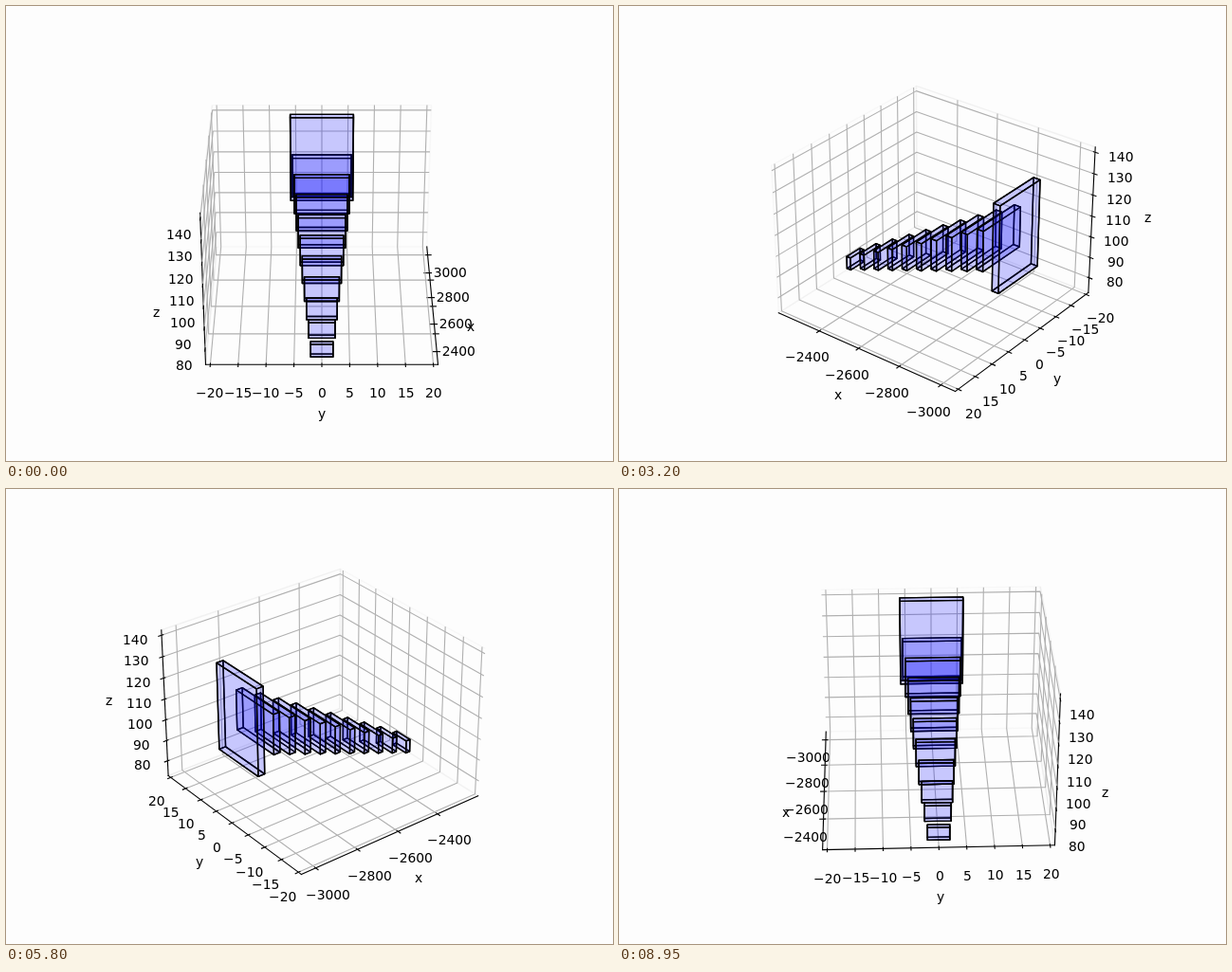
Recreate the animation shown at these times as an HTML page with a canvas. Size 640 by 480 pixels, loop 9000 ms.

```html
<!DOCTYPE html>
<html>
<head>
<meta charset="utf-8">
<style>
html, body { margin: 0; width: 100%; height: 100%; overflow: hidden; background: #fdfdfd; }
canvas { display: block; }
</style>
</head>
<body>
<canvas id="stage" width="640" height="480"></canvas>
<script>
const ctx = document.getElementById('stage').getContext('2d');

const FRAME_MS = 50, FRAMES = 180;
const ELEV = Math.PI / 6, DISTANCE = 10;
const SCALE = 369.6 / 0.185, CENTER_X = 333, CENTER_Y = 237.4;
const PT = 100 / 72;

// World space is centred on the plot box; the drawn box is 1/24 larger than the limits.
const SIZE = [8 / 7, 8 / 7, 6 / 7];
const HALF = SIZE.map(s => s / 2 * 25 / 24);
const DELTA = SIZE.map(s => s / 12);
const POINT = 48 / (2 * 369.6 * 0.72);
const LABEL_OFFSET = 25 * POINT, TICK_LABEL_OFFSET = 11.5 * POINT;

const range = (from, to, step) =>
  Array.from({ length: (to - from) / step + 1 }, (_, i) => from + i * step);

// "tickDir" is the dimension along which tick marks point.
const AXES = [
  { name: 'x', limits: [-3050, -2205], ticks: range(-3000, -2400, 200), tickDir: 1, pane: 242 },
  { name: 'y', limits: [-20, 20], ticks: range(-20, 20, 5), tickDir: 0, pane: 230 },
  { name: 'z', limits: [74, 141], ticks: range(80, 140, 10), tickDir: 0, pane: 236 }
];

function toWorld(value, dim) {
  const [lo, hi] = AXES[dim].limits;
  return (value - (lo + hi) / 2) / (hi - lo) * SIZE[dim];
}

// Corner bits: 1 = far x, 2 = far y, 4 = far z.
const FACES = [[0, 2, 6, 4], [1, 3, 7, 5], [0, 1, 5, 4], [2, 3, 7, 6], [0, 1, 3, 2], [4, 5, 7, 6]];

function corners(lo, hi) {
  return range(0, 7, 1).map(c => [0, 1, 2].map(d => (c >> d & 1 ? hi : lo)[d]));
}

const BOXES = range(0, 10, 1).map(i => {
  const center = [-2215 - 80 * i, 0, 78 + 4.2 * i];
  const half = [10 + 0.5 * i, 2 + 0.4 * i, i < 10 ? 3 + 0.7 * i : 20];
  const side = sign => center.map((c, d) => toWorld(c + sign * half[d], d));
  return corners(side(-1), side(1));
});
const PLOT_BOX = corners(HALF.map(h => -h), HALF);

let cosA, sinA;

function project([x, y, z]) {
  const c = Math.cos(ELEV), s = Math.sin(ELEV);
  const toward = x * cosA + y * sinA;
  const depth = DISTANCE - toward * c - z * s;
  return {
    x: CENTER_X + SCALE * (y * cosA - x * sinA) / depth,
    y: CENTER_Y - SCALE * (z * c - toward * s) / depth,
    depth
  };
}

const replace = (point, dim, value) => point.map((v, d) => d === dim ? value : v);

function pushOut(point, axis, amount) {
  return point.map((v, d) => d === axis ? v : v + Math.sign(v) * amount * DELTA[d]);
}

function trace(points) {
  ctx.beginPath();
  for (const p of points) ctx.lineTo(p.x, p.y);
}

function line(points, color, width, cap = 'butt') {
  trace(points.map(project));
  ctx.strokeStyle = color;
  ctx.lineWidth = width * PT;
  ctx.lineCap = cap;
  ctx.stroke();
}

function text(string, point, ascent) {
  const { x, y } = project(point);
  const left = x - ctx.measureText(string).width / 2;
  ctx.fillStyle = '#000';
  ctx.fillText(string, Math.round(left), Math.round(y + ascent));
}

function drawPane(dim, back) {
  const face = FACES[2 * dim + (back[dim] > 0 ? 1 : 0)];
  const order = dim === 2 ? face : [0, 1, 2, 3].map(i => face[i]);
  const tone = AXES[dim].pane;
  line(order.map(c => PLOT_BOX[c]), `rgba(${tone},${tone},${tone},.5)`, 1);
}

function drawAxis(dim, back, front) {
  const { name, ticks, tickDir, limits } = AXES[dim];
  const side = dim === 0 ? 1 : 0;
  const edge = replace(back, side, front[side]);
  const [d1, d2] = [0, 1, 2].filter(d => d !== dim);

  line([edge, replace(edge, dim, front[dim])], '#000', 0.8, 'square');

  for (const value of ticks) {
    const corner = replace(back, dim, toWorld(value, dim));
    line([replace(corner, d1, front[d1]), corner, replace(corner, d2, front[d2])], '#b0b0b0', 0.8);
  }
  for (const value of ticks) {
    const at = replace(edge, dim, toWorld(value, dim));
    const outward = Math.sign(edge[tickDir]) * DELTA[tickDir];
    line([-0.1, 0.2].map(k => replace(at, tickDir, at[tickDir] + k * outward)), '#000', 0.8, 'square');
    text(String(value).replace('-', '\u2212'), pushOut(at, dim, TICK_LABEL_OFFSET), 11);
  }
  text(name, pushOut(replace(edge, dim, 0), dim, LABEL_OFFSET), 4);
}

function drawBox(points) {
  const faces = FACES.map(face => face.map(c => points[c]));
  const meanDepth = face => face.reduce((sum, p) => sum + p.depth, 0);
  faces.sort((a, b) => meanDepth(b) - meanDepth(a));
  ctx.fillStyle = 'rgba(0,0,255,.115)';
  ctx.strokeStyle = '#000';
  ctx.lineWidth = PT;
  for (const face of faces) {
    trace(face);
    ctx.closePath();
    ctx.fill();
    ctx.stroke();
  }
}

function draw(azimuth) {
  cosA = Math.cos(azimuth);
  sinA = Math.sin(azimuth);
  ctx.fillStyle = '#fdfdfd';
  ctx.fillRect(0, 0, 640, 480);
  ctx.font = `${10 * PT}px "DejaVu Sans", sans-serif`;
  ctx.lineJoin = 'round';

  const facing = [cosA > -1e-9 ? 1 : -1, sinA > -1e-9 ? 1 : -1, 1];
  const front = HALF.map((h, d) => h * facing[d]);
  const back = front.map(v => -v);
  for (let d = 0; d < 3; d++) drawPane(d, back);
  for (let d = 0; d < 3; d++) drawAxis(d, back, front);

  const nearest = points => Math.min(...points.map(p => p.depth));
  BOXES.map(box => box.map(project))
    .sort((a, b) => nearest(b) - nearest(a))
    .forEach(drawBox);
}

const start = performance.now();
function tick() {
  const frame = Math.floor((performance.now() - start) / FRAME_MS) % FRAMES;
  draw(frame * 2 * Math.PI / FRAMES);
  requestAnimationFrame(tick);
}
tick();
</script>
</body>
</html>
```
